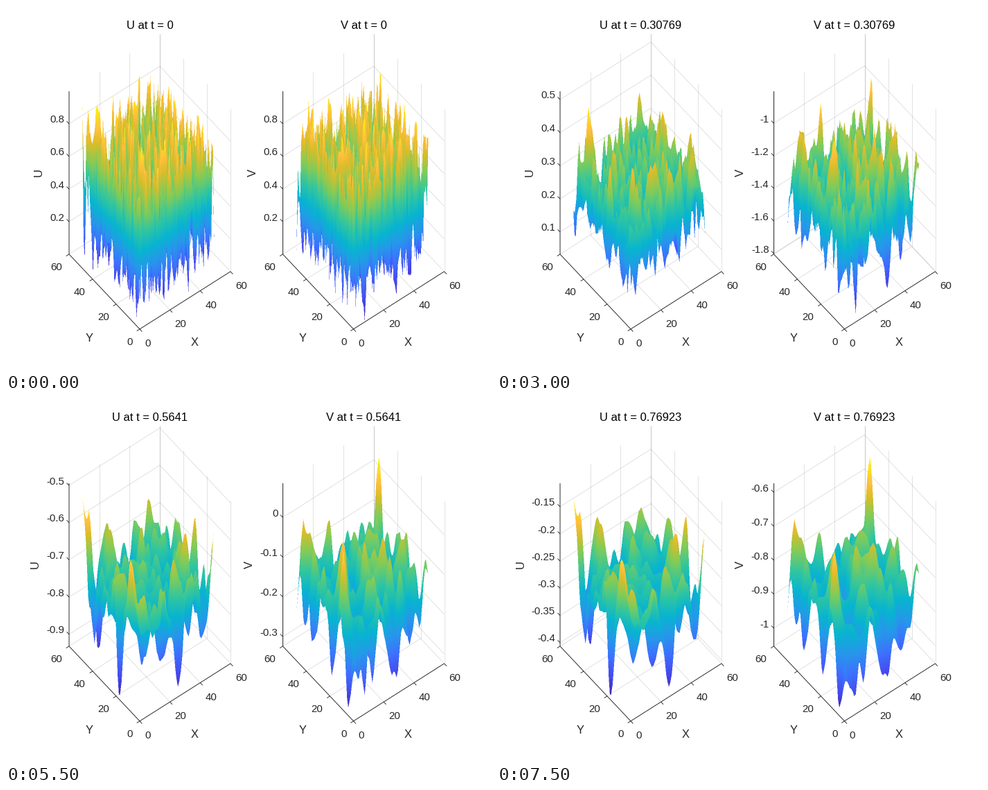
Animation, 700 px wide and 525 px high, one loop 8 s. Source, as a matplotlib script:

```python
import math

import numpy as np
import matplotlib.pyplot as plt
from matplotlib.animation import FuncAnimation
from matplotlib.collections import LineCollection
from matplotlib.colors import LinearSegmentedColormap

plt.rcParams["font.family"] = "Liberation Sans"

W, H, FRAMES, N = 700, 525, 16, 50
INK, PX = "#262626", 0.72            # PX: points per pixel at 100 dpi

# Oblique view: screen position of the front corner and the axis vectors
ORIGIN = np.array([193.0, 466.0])
EX = np.array([131.0, -83.0]) / 60
EY = np.array([-102.0, -108.0]) / 60
HEIGHT = 235.0
SHIFTS = {"U": 0.0, "V": 308.5}

PARULA = LinearSegmentedColormap.from_list("parula", [
    (0.000, (0.242, 0.150, 0.660)), (0.111, (0.280, 0.278, 0.922)),
    (0.222, (0.244, 0.436, 0.999)), (0.333, (0.154, 0.590, 0.922)),
    (0.444, (0.030, 0.708, 0.816)), (0.556, (0.194, 0.776, 0.625)),
    (0.667, (0.504, 0.799, 0.348)), (0.778, (0.863, 0.741, 0.160)),
    (0.845, (0.994, 0.746, 0.240)), (0.889, (0.989, 0.814, 0.189)),
    (1.000, (0.977, 0.984, 0.081)),
], N=512)

# Key steps of the value range, eased linearly in between
KEY_STEPS = [0, 4, 6, 9, 11, 13, 15]
KEY_RANGES = {
    "U": [(0.0005, 0.9995), (-0.307, 0.25), (0.033, 0.525), (0.608, 1.124),
          (-0.932, -0.494), (0.329, 0.687), (-0.4065, -0.1068)],
    "V": [(0.0005, 0.9995), (0.517, 1.728), (-1.804, -0.803), (-0.516, -0.048),
          (-0.324, 0.086), (0.237, 0.686), (-1.053, -0.573)],
}

# Lasting peaks and dips: x, y, relative height
RELIEF = {
    "U": [(1, 50, 0), (3, 47, .08), (2, 41, .85), (1, 18.5, 1), (1, 9, .08),
          (26, 1, .95), (35, 1, .3), (50, 1, .12)],
    "V": [(1, 43, .25), (1, 20, .12), (1, 6, .03), (13, 1, .15), (26, 1, .12),
          (50, 1, .6), (4, 14, .92), (50, 43, 1), (4, 48, .85)],
}
MEAN = {"U": 0.57, "V": 0.48}

rng = np.random.default_rng(11)
NOISE = {name: rng.random((N, N)) for name in "UV"}


def time(k):
    return 2 * k / 39


def value_range(name, k):
    lows, highs = zip(*KEY_RANGES[name])
    return np.interp(k, KEY_STEPS, lows), np.interp(k, KEY_STEPS, highs)


def diffuse(field, sigma):
    """Gaussian blur with reflecting edges."""
    i = np.arange(N)
    a, b = i[:, None], i[None, :]
    g = sum(np.exp(-d ** 2 / (2 * sigma ** 2))
            for d in (a - b, a + b + 1, a + b + 1 - 2 * N))
    g /= g.sum(axis=1, keepdims=True)
    return g @ field @ g.T


def surface(name, k):
    """Relative heights 0..1, indexed [x, y]; U turns over when negative."""
    t = time(k)
    z = diffuse(NOISE[name], math.hypot(0.45, 2.4 * t))
    z = (z - z.min()) / (z.max() - z.min())
    grown = np.clip((t - 0.2) / 0.2, 0, 1)
    z = (z - 0.5) * (1 - 0.2 * grown) + 0.5 + (MEAN[name] - 0.5) * grown
    x, y = np.meshgrid(np.arange(1, N + 1), np.arange(1, N + 1), indexing="ij")
    s = 1 + 1.4 * t
    for cx, cy, h in RELIEF[name]:
        w = grown * np.exp(-((x - cx) ** 2 + (y - cy) ** 2) / (2 * s * s))
        z = z * (1 - w) + h * w
    if name == "U" and sum(value_range(name, k)) < 0:
        z = 1 - z
    return np.clip(z, 0, 1)


# Sight lines: each half-pixel column crosses the grid from front to back
LEFT, RIGHT, TOP, BOTTOM, STEPS = 109, 302, 68, 468, 160
cols = np.arange(LEFT, RIGHT, 0.5) + 0.25
rows = (np.arange(TOP, BOTTOM, 0.5) + 0.25).astype(np.float32)
p = cols - ORIGIN[0]
x_in = np.maximum(1, (p - EY[0]) / EX[0])
x_out = np.minimum(N, (p - N * EY[0]) / EX[0])
valid = x_in < x_out
gx = x_in[:, None] + (x_out - x_in)[:, None] * np.linspace(0, 1, STEPS)
gy = (p[:, None] - EX[0] * gx) / EY[0]
floor_y = ORIGIN[1] + EX[1] * gx + EY[1] * gy
ix = np.clip(gx - 1, 0, N - 2).astype(int)
iy = np.clip(gy - 1, 0, N - 2).astype(int)
fx, fy = np.clip(gx - 1 - ix, 0, 1), np.clip(gy - 1 - iy, 0, 1)


def halve(a):
    return a[::2, ::2] + a[1::2, ::2] + a[::2, 1::2] + a[1::2, 1::2]


def render(grid):
    """Shade the nearest surface crossing of every half pixel, then average."""
    z = ((1 - fx) * ((1 - fy) * grid[ix, iy] + fy * grid[ix, iy + 1])
         + fx * ((1 - fy) * grid[ix + 1, iy] + fy * grid[ix + 1, iy + 1]))
    y = (floor_y - HEIGHT * z).astype(np.float32)
    above = y[:, None, :] < rows[None, :, None]
    cross = above[:, :, 1:] != above[:, :, :-1]
    near = cross.argmax(axis=2)
    hit = np.take_along_axis(cross, near[:, :, None], 2)[:, :, 0] & valid[:, None]
    c = np.arange(len(cols))[:, None]
    y0, y1 = y[c, near], y[c, near + 1]
    f = np.where(hit, (rows - y0) / np.where(y1 == y0, 1, y1 - y0), 0)
    shade = z[c, near] + f * (z[c, near + 1] - z[c, near])
    cover = halve(hit.astype(float))
    rgb = halve(PARULA(shade)[:, :, :3] * hit[:, :, None])
    rgb /= np.maximum(cover, 1)[:, :, None]
    return np.dstack([rgb, cover / 4]).clip(0, 1).transpose(1, 0, 2)


def ticks(lo, hi):
    span = hi - lo
    base = 10 ** math.floor(math.log10(span / 7.5))
    step = next(m * base for m in (1, 2, 5, 10) if span / (m * base) <= 7.5)
    return [round(i * step, 6)
            for i in range(math.ceil(lo / step), math.floor(hi / step) + 1)]


def text_width(s):
    return 15 * sum({"-": 0.333, ".": 0.278}.get(ch, 0.556) for ch in s)


fig = plt.figure(figsize=(W / 100, H / 100), dpi=100, facecolor="white")
ax = fig.add_axes([0, 0, 1, 1])
ax.axis("off")


def put(x, y, s, size=15, color=INK, **kw):
    kw = {"ha": "center", "va": "center_baseline", **kw}
    return ax.text(x, y, s, fontsize=size * PX, color=color, **kw)


def lines(segments, color=INK, z=3):
    lc = LineCollection(segments, colors=[color], linewidths=0.9 * PX, zorder=z)
    return ax.add_collection(lc)


GRID = (0.15, 0.15, 0.15, 0.15)
TICK = 5.0
OUT_X = -EY / np.hypot(*EY) * TICK
OUT_Y = -EX / np.hypot(*EX) * TICK


class Panel:
    def __init__(self, name):
        self.name = name
        self.shift = np.array([SHIFTS[name], 0])
        o = self.shift[0]
        at = self.at
        grid, frame = [], [[at(0, 60, 1), at(0, 60), at(0, 0), at(60, 0)]]
        for v in (0, 20, 40, 60):
            grid += [[at(v, 0), at(v, 60)], [at(v, 60), at(v, 60, 1)],
                     [at(0, v), at(60, v)], [at(60, v), at(60, v, 1)]]
            a, b = at(v, 0), at(0, v)
            frame += [[a, a + OUT_X], [b, b + OUT_Y]]
            put(a[0] + 7, a[1] + 19.5, str(v), ha="left")
            put(b[0] - 10, b[1] + 17.5, str(v), ha="right")
        lines(grid, GRID, 1)
        lines(frame)
        put(272 + o, 483.5, "X", 16.5)
        put(120 + o, 477.5, "Y", 16.5)
        self.title = put(207.5 + o, 27.3, "", 16.5, "black")
        self.label = put(0, 240, name, 16.5, rotation=90, va="center")
        self.z_grid = lines([], GRID, 1)
        self.z_ticks = lines([])
        self.numbers = [put(84 + o, 0, "", ha="right") for _ in range(9)]
        left = LEFT + int(o + 0.5)
        self.image = ax.imshow(
            np.zeros((BOTTOM - TOP, RIGHT - LEFT, 4)), aspect="auto",
            extent=(left, left + RIGHT - LEFT, BOTTOM, TOP),
            interpolation="nearest", zorder=2)

    def at(self, x, y, z=0):
        return ORIGIN + self.shift + x * EX + y * EY - [0, HEIGHT * z]

    def draw(self, k):
        lo, hi = value_range(self.name, k)
        values = ticks(lo, hi)
        levels = [(v - lo) / (hi - lo) for v in values]
        names = [f"{v:g}" for v in values]
        corner = [self.at(0, 60, z) for z in levels]
        self.z_grid.set_segments(
            [[self.at(0, 60, z), self.at(60, 60, z), self.at(60, 0, z)]
             for z in levels])
        self.z_ticks.set_segments([[c, c - OUT_X] for c in corner])
        for i, t in enumerate(self.numbers):
            shown = i < len(names)
            t.set_text(names[i] if shown else "")
            if shown:
                t.set_y(corner[i][1] - 7)
        self.label.set_x(68.5 + self.shift[0] - max(map(text_width, names)))
        self.title.set_text(f"{self.name} at t = {time(k):.5g}")
        self.image.set_data(render(surface(self.name, k)))


panels = [Panel(name) for name in "UV"]
ax.set_xlim(0, W)
ax.set_ylim(H, 0)


def update(k):
    for panel in panels:
        panel.draw(k)
    return []


anim = FuncAnimation(fig, update, frames=FRAMES, interval=500,
                     repeat=True, repeat_delay=0, blit=False)
plt.show()
```
